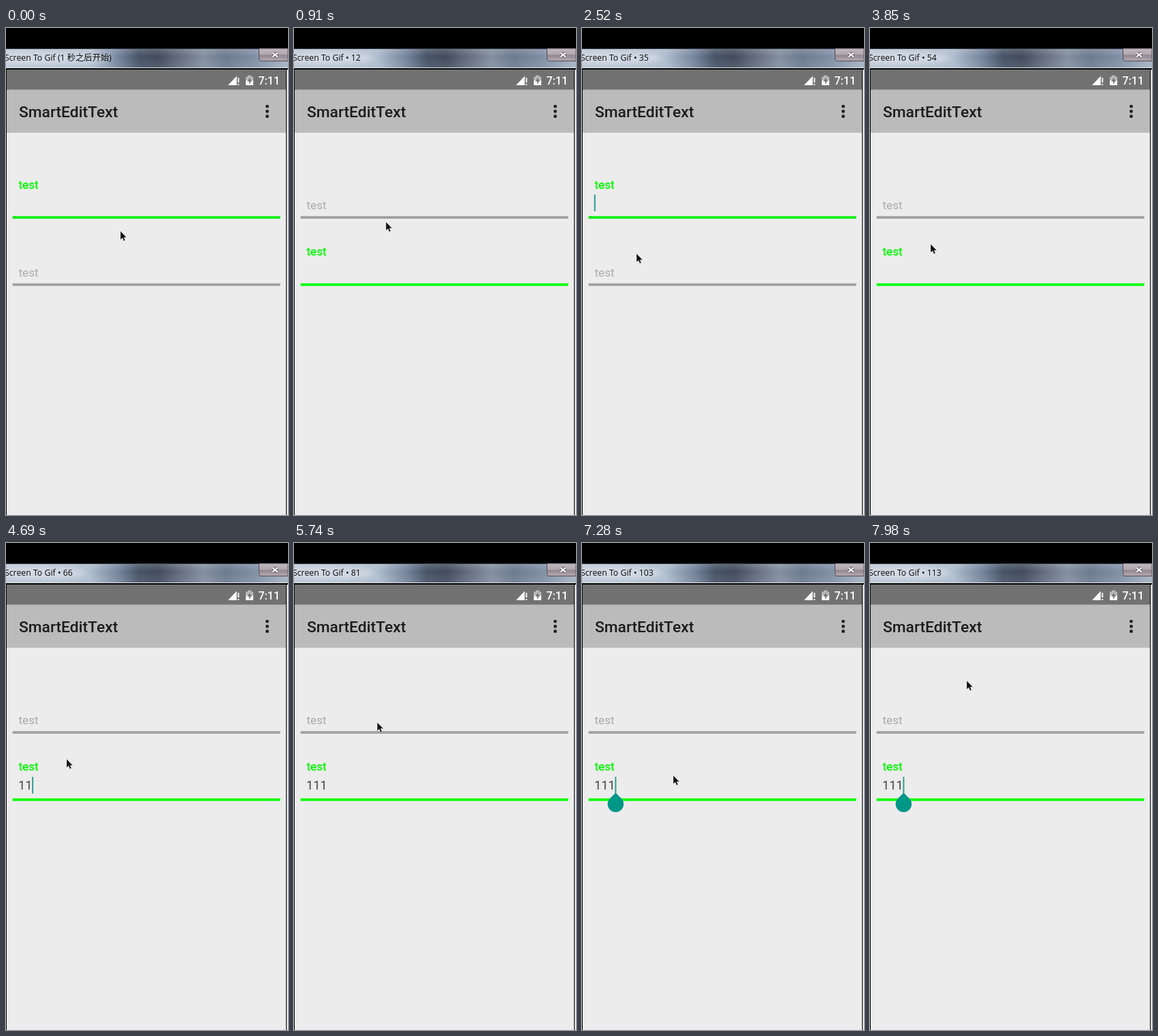
Write an HTML page that moves like this. It is 414 px wide and 715 px high and loops after 8000 ms.

```html
<!DOCTYPE html>
<html lang="en">
<head>
<meta charset="utf-8">
<title>SmartEditText</title>
<style>
  html, body { margin: 0; width: 100%; height: 100%; overflow: hidden; background: #000; }
  svg { display: block; width: 414px; height: 715px; }
  text { font-family: Roboto, sans-serif; white-space: pre; }
  #caption { font: 12.3px "Open Sans", "Noto Sans CJK SC", "Noto Sans CJK", sans-serif; }
  .label { font-size: 17.1px; }
  .value { font-size: 18.2px; fill: #444; }
</style>
</head>
<body>
<svg viewBox="0 0 414 715">
  <defs>
    <linearGradient id="glass">
      <stop offset="0" stop-color="#b5c1d0"/>
      <stop offset=".3" stop-color="#a9b7c9"/>
      <stop offset=".4" stop-color="#6f7f97"/>
      <stop offset=".47" stop-color="#424e62"/>
      <stop offset=".54" stop-color="#3c4658"/>
      <stop offset=".61" stop-color="#5b6577"/>
      <stop offset=".7" stop-color="#7f8b9c"/>
      <stop offset=".78" stop-color="#68768b"/>
      <stop offset=".88" stop-color="#7c8ba1"/>
      <stop offset="1" stop-color="#a3b0c0"/>
    </linearGradient>
    <linearGradient id="shade" x2="0" y2="1">
      <stop offset="0" stop-color="#fff" stop-opacity=".2"/>
      <stop offset=".4" stop-color="#fff" stop-opacity=".03"/>
      <stop offset="1" stop-color="#fff" stop-opacity=".12"/>
    </linearGradient>
    <linearGradient id="closeFill" x2="0" y2="1">
      <stop offset="0" stop-color="#c3bbc1"/>
      <stop offset=".48" stop-color="#b0a6ad"/>
      <stop offset=".54" stop-color="#91868e"/>
      <stop offset="1" stop-color="#b5abb2"/>
    </linearGradient>
    <filter id="blur" x="-20%" y="-80%" width="140%" height="260%"><feGaussianBlur stdDeviation="5"/></filter>
    <clipPath id="bar"><path d="M0 30H414V59H0z"/></clipPath>
  </defs>

  <!-- window frame -->
  <path d="M0 0H414V715H0z"/>
  <path d="M0 30H414V59H0z" fill="url(#glass)"/>
  <path d="M0 30H414V59H0z" fill="url(#shade)"/>
  <g clip-path="url(#bar)">
    <ellipse id="glow" cx="50" cy="44" rx="70" ry="9" fill="#e6ecf3" opacity=".65" filter="url(#blur)"/>
  </g>
  <path d="M0 30.5H414" stroke="#3c4552"/>
  <path d="M0 58.5H414" stroke="#dfe5ec"/>
  <path d="M371.5 30V45q0 3.5 3.5 3.5H414V30z" fill="url(#closeFill)" stroke="#544b52"/>
  <g fill="none">
    <path d="M391.3 36.4l7.4 6m0-6l-7.4 6" stroke="#5a5058" stroke-width="4"/>
    <path d="M391.3 36.4l7.4 6m0-6l-7.4 6" stroke="#fff" stroke-width="2.2"/>
  </g>
  <text id="caption" x="-2" y="48" fill="#080808"></text>

  <!-- phone screen -->
  <path d="M1 61.5H411V715H1z" fill="#ececec"/>
  <path d="M1 61.5H411V91H1z" fill="#717271"/>
  <path d="M1 90.6H411V153.8H1z" fill="#bbb"/>
  <path d="M412 61H414V715H412z" fill="#dcdfe2"/>
  <g fill="#fff">
    <path d="M326 84L338.7 70.5V84z"/>
    <path d="M340.4 73h1.8v7h-1.8zM340.4 82h1.8v2h-1.8z"/>
    <path d="M352 71.5h3v-2h5v2h3V77h-11z" opacity=".5"/>
    <path d="M352 77h11v7h-11z"/>
    <path d="M358.5 72.5l-4.4 5.8h2.8v4.3l4.5-6h-2.9z" fill="#717271"/>
    <text x="370.5" y="82.7" font-size="16" font-weight="500">7:11</text>
  </g>
  <text x="19" y="131" font-size="22.8" font-weight="500" fill="#1b1b1b">SmartEditText</text>
  <g fill="#1b1b1b">
    <circle cx="383.5" cy="115.1" r="2.4"/>
    <circle cx="383.5" cy="122.4" r="2.4"/>
    <circle cx="383.5" cy="129.7" r="2.4"/>
  </g>

  <g id="fields"></g>
  <path id="caret" d="M0 0V24.5" stroke="#26978e" stroke-width="1.9"/>
  <path id="handle" d="M49.4 366.8L57.7 375.1A11.7 11.7 0 1 1 41.1 375.1z" fill="#009688"/>
  <path id="pointer" d="M0 -.7V11.8L2.9 9.2L4.9 13.7L7 12.8L5.1 8.4H9z" fill="#101014" stroke="#fff" stroke-opacity=".6" stroke-width=".6"/>
</svg>
<script>
const LOOP = 8000, STEP = 70, FADE = 300, BLINK = 500;
const $ = id => document.getElementById(id);

const focusSteps = [[-700, 0], [280, 1], [1500, 0], [3290, 1], [5800, 0], [6950, 1]];
const keyTimes = [4410, 4620, 4850];
const pointerPath = [
  [0, 168, 299], [280, 163, 308], [560, 155, 306], [910, 135, 285.5], [1480, 112, 264],
  [1800, 108, 268], [2520, 80, 332], [2900, 82, 334], [3290, 89, 318], [5040, 89, 318],
  [5700, 122, 264], [6000, 126, 268], [6510, 139, 308], [6900, 133, 345],
  [7300, 134, 342], [7980, 142, 203], [8000, 142, 203]
];

const ease = p => (1 - Math.cos(Math.PI * Math.min(1, Math.max(0, p)))) / 2;
const mix = (a, b, p) => a + (b - a) * p;
const blend = (a, b, p) => `rgb(${a.map((v, i) => Math.round(mix(v, b[i], p)))})`;
const lastBefore = (rows, t) => rows.filter(r => r[0] <= t).pop();

function add(parent, tag, attrs) {
  const el = document.createElementNS("http://www.w3.org/2000/svg", tag);
  for (const name in attrs) el.setAttribute(name, attrs[name]);
  return parent.appendChild(el);
}

function makeField(lineY, accent) {
  const root = $("fields");
  const line = add(root, "rect", { x: 9.6, y: lineY - 1.9, width: 393, height: 3.8 });
  const label = add(root, "text", { x: 18.5, class: "label" });
  const value = add(root, "text", { x: 18, y: lineY - 14.6, class: "value" });
  label.textContent = "test";
  return {
    lineY,
    draw(focus, text) {
      const lift = text ? 1 : focus;
      const color = blend([168, 170, 168], [0, 250, 0], focus);
      line.setAttribute("fill", blend([160, 161, 160], accent, focus));
      label.setAttribute("fill", color);
      label.setAttribute("stroke", color);
      label.setAttribute("stroke-width", focus * 0.35);
      label.setAttribute("y", lineY - mix(12.2, 42.6, lift));
      value.textContent = text;
    }
  };
}

const fields = [makeField(278.1, [8, 240, 18]), makeField(376.8, [0, 255, 0])];

function pointerAt(t) {
  const i = pointerPath.findIndex(p => p[0] > t);
  const [t0, x0, y0] = pointerPath[i - 1], [t1, x1, y1] = pointerPath[i];
  const p = ease((t - t0) / (t1 - t0));
  return [mix(x0, x1, p), mix(y0, y1, p)];
}

function render(time) {
  const tick = Math.floor((time % LOOP) / STEP), t = tick * STEP;
  $("caption").textContent = "Screen To Gif " + (tick ? "• " + (tick - 1) : "(1 秒之后开始)");
  $("glow").setAttribute("rx", tick ? 70 : 105);

  const [since, active] = lastBefore(focusSteps, t);
  const p = ease((t - since) / FADE);
  const second = active ? p : 1 - p;
  const typed = "1".repeat(keyTimes.filter(k => k <= t).length);
  fields[0].draw(1 - second, "");
  fields[1].draw(second, typed);

  const blinkStart = Math.max(since, ...keyTimes.filter(k => k <= t));
  const shown = Math.floor((t - blinkStart) / BLINK) % 2 === 0;
  const caretX = 18.8 + (active ? typed.length * 10.2 : 0);
  $("caret").setAttribute("transform", `translate(${caretX} ${fields[active].lineY - 33.5})`);
  $("caret").setAttribute("visibility", shown ? "visible" : "hidden");
  $("handle").setAttribute("visibility", t >= 6950 ? "visible" : "hidden");
  $("pointer").setAttribute("transform", `translate(${pointerAt(t)})`);
}

const start = performance.now();
function loop() {
  render(performance.now() - start);
  requestAnimationFrame(loop);
}
loop();
</script>
</body>
</html>
```
